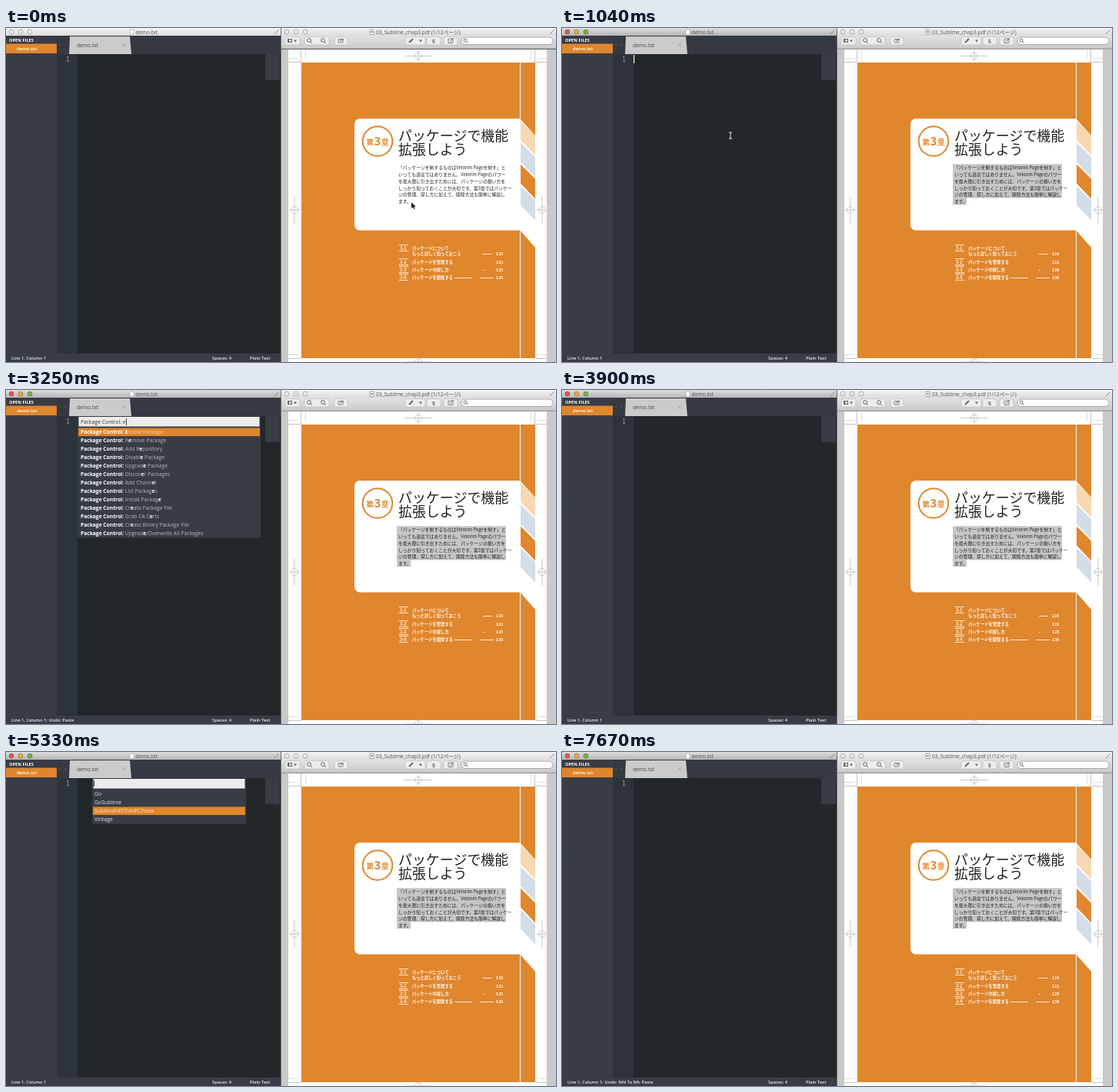
Animation, 715 px wide and 435 px high, one loop 7.8 s. Source, as an HTML page with a canvas:

```html
<!DOCTYPE html>
<html lang="ja">
<head>
<meta charset="utf-8">
<title>Editor and PDF</title>
<style>
html, body { margin: 0; width: 100%; height: 100%; overflow: hidden; background: #22282a; }
canvas { display: block; }
</style>
</head>
<body>
<canvas id="stage" width="715" height="435"></canvas>
<script>
const ctx = document.getElementById('stage').getContext('2d');
const LOOP = 7800, STEP = 130;
const ORANGE = '#e0862d', PANEL = '#393c45', MARK = '#c4c4c4';
const UI = '"Open Sans", "Noto Sans", sans-serif';
const JP = '"Noto Sans CJK JP", "Noto Sans CJK", sans-serif';
const CODE = '"DejaVu Sans Mono", "Noto Sans CJK JP", monospace';

const bookText = [
  '「パッケージを制するものはVelorim Pageを制す」と',
  'いっても過言ではありません。Velorim Pageのパワー',
  'を最大限に引き出すためには、パッケージの扱い方を',
  'しっかり知っておくことが大切です。第3章ではパッケー',
  'ジの管理、探し方に加えて、開発方法も簡単に解説し',
  'ます。'];
const cleanPaste = [
  '「パッケージを制するものはVelorim Pageを制す」と',
  'いっても過言ではありません。Velorim Pageのパワー',
  'を最大限に引き出すためには、 パッケージの扱い方を',
  'しっかり知っておくことが大切です。第 3',
  '章ではパッケー ジの管理、 探し方に加えて、',
  '開発方法も簡単に解説し ます。'];
// Decomposed text shows its voicing marks as separate characters.
const brokenPaste = [
  '「パッケージを制するものはVelorim Pageを',
  '制す」といっても過言ではありません。Velorim',
  'Pageのパワーを最大限に引き出すためには、',
  'パッケージの扱い方をしっかり知ってお',
  'くことが大切です。第 3',
  '章ではパッケー ジの管理、',
  '探し方に加えて、',
  '開発方法も簡単に解説し ます。'
].map(s => s.normalize('NFD').replace(/\u3099/g, '゛').replace(/\u309a/g, '゜'));
const commands = ['Enable Package', 'Remove Package', 'Add Repository', 'Disable Package',
  'Upgrade Package', 'Discover Packages', 'Add Channel', 'List Packages', 'Install Package',
  'Create Package File', 'Grab CA Certs', 'Create Binary Package File',
  'Upgrade/Overwrite All Packages'];
const disabled = ['Go', 'GoSublime', 'SublimeNFDToNFCPaste', 'Vintage'];

function rect(x, y, w, h, color) {
  ctx.fillStyle = color;
  ctx.fillRect(x, y, w, h);
}
function poly(points, color) {
  ctx.fillStyle = color;
  ctx.beginPath();
  points.forEach(p => ctx.lineTo(...p));
  ctx.fill();
}
function line(x1, y1, x2, y2, color = MARK, width = 1) {
  ctx.strokeStyle = color;
  ctx.lineWidth = width;
  ctx.beginPath();
  ctx.moveTo(x1, y1);
  ctx.lineTo(x2, y2);
  ctx.stroke();
}
function ring(x, y, r, color, width = 1) {
  ctx.strokeStyle = color;
  ctx.lineWidth = width;
  ctx.beginPath();
  ctx.arc(x, y, r, 0, 7);
  ctx.stroke();
}
function disc(x, y, r, color) {
  ctx.fillStyle = color;
  ctx.beginPath();
  ctx.arc(x, y, r, 0, 7);
  ctx.fill();
}
function roundBox(x, y, w, h, r, fill, stroke) {
  ctx.beginPath();
  ctx.roundRect(x, y, w, h, r);
  ctx.fillStyle = fill;
  ctx.fill();
  if (!stroke) return;
  ctx.strokeStyle = stroke;
  ctx.lineWidth = 0.8;
  ctx.stroke();
}
function text(s, x, y, size, color, family = UI, weight = 400) {
  ctx.font = `${weight} ${size}px ${family}`;
  ctx.fillStyle = color;
  ctx.fillText(s, x, y);
  return x + ctx.measureText(s).width;
}
function gradient(y1, y2, from, to) {
  const g = ctx.createLinearGradient(0, y1, 0, y2);
  g.addColorStop(0, from);
  g.addColorStop(1, to);
  return g;
}

function titleBar(x, w, active) {
  rect(x, 0, w, 10, active ? gradient(0, 10, '#dedede', '#b4b4b4') : gradient(0, 10, '#f4f4f4', '#dcdcdc'));
  ['#e8564c', '#e9ad38', '#72b544'].forEach((color, i) => {
    const cx = x + 7 + i * 12;
    if (active) disc(cx, 5, 3, color);
    ring(cx, 5, 3, active ? '#00000055' : '#a4a4a4', 0.8);
  });
  line(x + w - 8, 8, x + w - 2, 2, '#888');
}

function registration(x, y, vertical) {
  ring(x, y, 4.5, '#bbb', 0.8);
  const dx = vertical ? 0 : 18, dy = vertical ? 18 : 0;
  line(x - dx, y - dy, x + dx, y + dy, '#bbb', 0.8);
  line(x - (vertical ? 7 : 0), y - (vertical ? 0 : 7), x + (vertical ? 7 : 0), y + (vertical ? 0 : 7), '#bbb', 0.8);
}

function pdfToolbar() {
  rect(358, 10, 357, 17, gradient(10, 27, '#e2e2e2', '#c9c9c9'));
  line(358, 27, 715, 27, '#a2a2a2');
  [[363, 19], [388, 32], [427, 17], [519, 26], [547, 18], [569, 18]].forEach(([x, w]) =>
    roundBox(x, 11.5, w, 10.5, 2, '#ededed', '#c2c2c2'));
  rect(366, 14, 6, 5, '#666');
  rect(368, 15, 3, 3, '#ddd');
  poly([[374, 15.5], [378, 15.5], [376, 18.5]], '#666');
  [394, 412].forEach(x => {
    ring(x, 16, 2.4, '#666');
    line(x + 2, 18, x + 4, 20, '#666');
  });
  roundBox(432, 14.5, 6, 4.5, 0.5, '#ededed', '#666');
  line(434, 17, 439, 14, '#666');
  line(524, 19, 529, 14, '#666', 2);
  poly([[537, 15.5], [541, 15.5], [539, 18.5]], '#666');
  text('5', 554, 19.5, 7, '#666', UI, 700);
  roundBox(575, 14, 6, 5.5, 0.5, '#ededed', '#666');
  line(577, 18, 582, 13, '#666');
  roundBox(592, 12, 119, 9.5, 5, '#fff', '#999');
  ring(597, 16, 2, '#666', 0.9);
  line(598.5, 17.5, 600.5, 19.5, '#666');
}

function pdfPage(selected) {
  rect(358, 28, 357, 407, '#c9c9c9');
  rect(367, 28, 336, 407, '#fff');
  [383.5, 687.5].forEach(x => line(x, 28, x, 45));
  [44.5, 430.5].forEach(y => {
    line(367, y, 384, y);
    line(688, y, 703, y);
  });
  [389.5, 682.5].forEach(x => line(x, 28, x, 41, '#ddd'));
  [39.5, 425.5].forEach(y => {
    line(367, y, 380, y, '#ddd');
    line(691, y, 703, y, '#ddd');
  });
  registration(536, 36.5, false);
  registration(375, 237, true);
  registration(697, 237, true);

  rect(384, 45, 304, 385, ORANGE);
  registration(536, 435, false);
  line(668.5, 45, 668.5, 430, '#fff');
  roundBox(453, 118, 215.5, 145.5, [7, 0, 0, 7], '#fff');
  poly([[668, 118], [688, 140], [688, 286], [668, 263]], '#fff');
  ['#f8d8b2', '#d3dce7', ORANGE, '#d3dce7'].forEach((color, i) => {
    const y = 121 + i * 28.2;
    poly([[669, y], [688, y + 19], [688, y + 45], [669, y + 25]], color);
  });

  ring(483, 147.5, 19.3, ORANGE, 2);
  text('第', 468.5, 152, 9.5, ORANGE, JP, 700);
  text('3', 478.5, 153, 15, ORANGE, JP, 700);
  text('章', 488, 152, 9.5, ORANGE, JP, 700);
  text('パッケージで機能', 510, 147, 17.9, '#202020', JP, 500);
  text('拡張しよう', 510, 165, 17.9, '#202020', JP, 500);

  bookText.forEach((s, i) => {
    const y = 182 + i * 8.8;
    if (i >= bookText.length * (1 - selected)) rect(508, y - 4.8, i === 5 ? 18 : 142, 9, '#c6c6c6');
    text(s, 510, y + 2.2, 5.8, '#202020', JP, 500);
  });

  const contents = [['パッケージについて', 287, 294, 116], ['パッケージを管理する', 305, 305, 121],
    ['パッケージの探し方', 315, 315, 125], ['パッケージを開発する', 325, 325, 130]];
  contents.forEach(([title, y, pageY, page], i) => {
    line(511, y - 4.5, 523, y - 4.5, '#fff', 0.8);
    line(511, y + 3.5, 523, y + 3.5, '#fff', 0.8);
    text('3-' + (i + 1), 512, y + 2, 5.5, '#fff', JP, 700);
    text(title, 528, y + 2, 5.3, '#fff', JP, 700);
    text(page, 637, pageY + 2, 5.3, '#fff', JP, 700);
  });
  text('もっと詳しく知っておこう', 528, 296, 5.3, '#fff', JP, 700);
  [[620, 632, 294.5], [620, 622, 315.5], [583, 606, 325.5], [616, 634, 325.5]].forEach(([a, b, y]) =>
    line(a, y, b, y, '#fff', 0.8));
}

function pdfWindow(active, selected) {
  titleBar(358, 357, active);
  roundBox(473, 2, 5, 6.5, 0.5, '#fff', '#888');
  rect(474.5, 4, 2, 2, '#777');
  text('03_Sublime_chap3.pdf (1/12ページ)', 481, 7.7, 6.7, '#555', `${UI}, ${JP}`);
  pdfToolbar();
  pdfPage(selected);
}

function editorWindow(active, lines, status, caret) {
  rect(0, 10, 358, 425, PANEL);
  rect(66, 34, 27, 390, '#2d333b');
  rect(93, 34, 264, 390, '#22282a');
  rect(66, 10, 291, 24, '#353942');
  titleBar(0, 357, active);
  roundBox(161, 2, 5, 6.5, 0.5, '#fff', '#aaa');
  text('demo.txt', 168.5, 7.7, 6.8, '#555');

  text('OPEN FILES', 4, 18, 5.7, '#fff', UI, 700);
  rect(0, 20.5, 66, 12.5, ORANGE);
  text('demo.txt', 14, 29, 6, '#fff', UI, 600);
  disc(70, 22, 0.8, '#686c74');
  disc(77, 22, 0.8, '#686c74');
  poly([[82, 34], [83, 11], [161, 11], [163, 34]], '#cbcbcb');
  text('demo.txt', 92, 24.7, 6.7, '#444');
  if (lines.length) ring(153, 22, 2.8, '#d99a54');
  else {
    line(150.5, 19.5, 155.5, 24.5, '#aaa');
    line(150.5, 24.5, 155.5, 19.5, '#aaa');
  }

  rect(337, 34, 19, 34, '#373b44');
  text('1', 78, 44, 8, '#9a9d9f', CODE);
  let end = 93;
  lines.forEach((s, i) => {
    end = text(s, 93, 43.8 + i * 11.4, 9, '#f2f2ec', CODE);
    rect(338, 35 + i * 1.5, Math.min(17, s.length * 0.6), 0.6, '#7d8085');
  });
  const row = Math.max(0, lines.length - 1);
  if (caret) rect(end, 35 + row * 11.4, 1.2, 11, '#f4f4f0');

  rect(0, 424, 357, 11, PANEL);
  ctx.save();
  ctx.beginPath();
  ctx.rect(0, 424, 355, 11);
  ctx.clip();
  const statusEnd = text(status, 7, 432, 5.7, '#eee', UI, 600);
  ctx.restore();
  if (statusEnd < 260) {
    text('Spaces: 4', 268, 432, 5.7, '#eee', UI, 600);
    text('Plain Text', 317, 432, 5.7, '#eee', UI, 600);
  }
  rect(357, 0, 1, 435, '#6d6f73');
}

function panel(x, w, rows, selected) {
  rect(x, 34, w, 16 + rows * 10.96, PANEL);
  rect(x + 1.5, 35, w - 3, 12.5, '#ececec');
  rect(x + 1, 49.5 + selected * 10.96, w - 2, 10.6, ORANGE);
}

// Positions of the query's letters in the label, or null if it does not match.
function fuzzy(label, query) {
  const hits = [];
  let from = 0;
  for (const c of query) {
    const at = label.toLowerCase().indexOf(c, from);
    if (at < 0) return null;
    hits.push(at);
    from = at + 1;
  }
  return hits;
}

function commandPalette(query) {
  const found = commands.map(label => ({ label, hits: fuzzy(label, query) })).filter(c => c.hits);
  panel(93, 238, found.length, 0);
  const end = text('Package Control: ' + query, 97, 43.7, 6.8, '#333');
  rect(end + 0.5, 37, 0.9, 9, '#333');
  found.forEach(({ label, hits }, i) => {
    const y = 57 + i * 10.96;
    let x = text('Package Control: ', 97, y, 6.7, '#fff', UI, 700);
    [...label].forEach((c, k) => {
      const hit = hits.includes(k);
      x = text(c, x, y, 6.8, hit ? '#fff' : i ? '#b4b6bb' : '#f3cfa5', UI, hit ? 700 : 400);
    });
  });
}

function packageList(selected, caret) {
  panel(112, 200, disabled.length, selected);
  if (caret) rect(114, 37, 1, 8, '#333');
  disabled.forEach((s, i) =>
    text(s, 115, 57 + i * 10.96, 6.9, i === selected ? '#f8e0c4' : '#e4e5e7'));
}

function pointer(t) {
  if (t >= 2990) return;
  const path = [[0, 527, 227], [260, 527, 227], [520, 510, 180], [650, 510, 180], [910, 219, 140], [2990, 219, 140]];
  const i = path.findIndex(p => p[0] > t);
  const [t1, x1, y1] = path[i - 1], [t2, x2, y2] = path[i];
  const p = (t - t1) / (t2 - t1), x = x1 + (x2 - x1) * p, y = y1 + (y2 - y1) * p;
  if (t < 260) {
    poly([[x, y], [x, y + 8], [x + 2, y + 6.3], [x + 3.3, y + 9], [x + 4.6, y + 8.3], [x + 3.4, y + 5.8], [x + 5.8, y + 5.6]], '#222');
    return;
  }
  const color = x < 358 ? '#e8e8e8' : '#222';
  line(x, y - 4, x, y + 4, color);
  [-4, 4].forEach(d => line(x - 2, y + d, x + 2, y + d, color));
}

function draw(now) {
  const t = Math.floor(now % LOOP / STEP) * STEP;
  const between = (a, b) => t >= a && t < b;
  const broken = between(1430, 2340), clean = between(5720, 7150);

  let status = 'Line 1, Column 1';
  if (broken) status = 'Line 1, Column 168';
  else if (between(2340, 3900)) status += '; Undo: Paste';
  else if (between(5460, 7150)) {
    status = `Line 1, Column ${clean ? 148 : 1}; Package SublimeNFDToNFCPaste successfully removed from list of disabled packages – restarting Sublime Text may be required`;
  } else if (t >= 7150) status += '; Undo: Nfd To Nfc Paste';

  const caret = between(1040, 1950) || between(2210, 2990) ||
    between(5460, 7670) && Math.floor((t - 5460) / 520) % 2 === 0 || between(6240, 6370);
  pdfWindow(between(130, 1040), Math.min(1, Math.max(0, (t - 260) / 260)));
  editorWindow(t >= 1040, broken ? brokenPaste : clean ? cleanPaste : [], status, caret);

  if (between(2990, 3900)) commandPalette('enab'.slice(0, Math.max(0, (t - 3120) / STEP)));
  if (between(4030, 5460)) {
    packageList(t < 5070 ? 0 : t < 5200 ? 1 : 2, t < 4420 || between(4680, 4810) || t >= 5070);
  }
  pointer(t);
}

function tick(now) {
  draw(now);
  requestAnimationFrame(tick);
}
requestAnimationFrame(tick);
</script>
</body>
</html>
```
